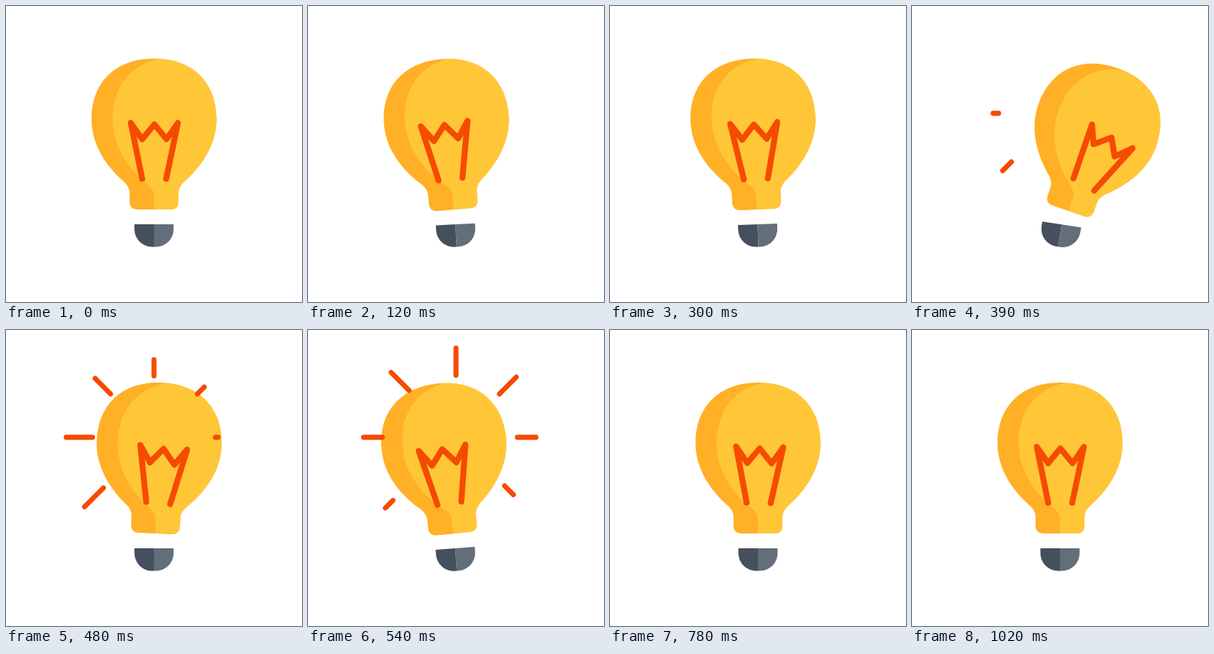
An HTML page that plays this animation: 400 by 400 pixels, repeating every 2.05 s.

```html
<!DOCTYPE html>
<html lang="en">
<head>
<meta charset="utf-8">
<title>Light bulb</title>
<style>
  html, body { margin: 0; width: 100%; height: 100%; overflow: hidden; background: #fff; }
  svg { display: block; width: 100%; height: 100%; }
  .wire { fill: none; stroke: #f54b00; stroke-linecap: round; stroke-linejoin: round; }
</style>
</head>
<body>
<svg viewBox="0 0 400 400">
  <defs>
    <clipPath id="glass">
      <path id="outline" d="M200 71C147 71 115.5 104 115.5 153C115.5 190 139 220 160 238Q167 245 167 253V264Q167 275 178 275H222Q233 275 233 264V253Q233 245 240 238C261 220 284.5 190 284.5 153C284.5 104 253 71 200 71Z"/>
    </clipPath>
  </defs>
  <g id="base">
    <path fill="#464f5d" d="M173.500 295H200V325.500H197.500A24 24 0 0 1 173.500 301.500Z"/>
    <path fill="#636e7b" d="M200 295H226.500V301.500A24 24 0 0 1 202.500 325.500H200Z"/>
    <g id="bulb">
      <use href="#outline" fill="#ffb026"/>
      <path clip-path="url(#glass)" fill="#ffc738" d="M213 71C170 76 144 108 144 153C144 190 167 222 190 240Q200 247 200 256V280H300V60H213Z"/>
      <path id="filament" class="wire" stroke-width="8" d="M184 233.500L168.700 158L184 180L200.500 160L217 180L232.300 158L216.500 233.500"/>
    </g>
  </g>
  <g id="rays" class="wire" stroke-width="6.8"></g>
</svg>
<script>
const LOOP = 2050, STEP = 30, END = 1020;
const RAYS = 7, RAY_START = 340, RAY_DELAY = 25, RAY_LENGTH = 42;
const $ = id => document.getElementById(id);
const ramp = (t, from, to) => Math.min(1, Math.max(0, (t - from) / (to - from)));
const easeOut = x => Math.sin(Math.PI / 2 * x);
const easeInOut = x => (1 - Math.cos(Math.PI * x)) / 2;
const ease = (t, from, to) => easeInOut(ramp(t, from, to));

// Wind up to the left, swing right, swing back, settle upright
function swing(t, windUp, peak, back) {
  return windUp * ease(t, 0, 252)
    + (peak - windUp) * ease(t, 252, 390)
    + (back - peak) * ease(t, 390, 540)
    - back * ease(t, 540, 780);
}

function rotate(id, angle, pivotY) {
  $(id).setAttribute('transform', `rotate(${angle} 200 ${pivotY})`);
}

const rays = Array.from({ length: RAYS }, () =>
  $('rays').appendChild(document.createElementNS('http://www.w3.org/2000/svg', 'line')));

// Rays appear clockwise from the lower left; each grows outward, then its tail follows
function drawRay(line, i, t) {
  const angle = Math.PI * (3 + i) / 4;
  const dx = Math.cos(angle), dy = Math.sin(angle);
  const inner = 83 + 14 * Math.max(0, dy);
  const age = t - RAY_START - i * RAY_DELAY;
  const head = easeOut(ramp(age, 6, 175));
  const tail = ease(age, 112, 258);
  [tail, head].forEach((k, n) => {
    const r = inner + RAY_LENGTH * k;
    line.setAttribute('x' + (n + 1), 200 + dx * r);
    line.setAttribute('y' + (n + 1), 145 + dy * r);
  });
  line.setAttribute('visibility', head > tail ? 'visible' : 'hidden');
}

function draw(t) {
  const lag = 0.9 * Math.sin(Math.PI * ramp(t, 540, END));
  rotate('base', swing(t, -6.4, 8.7, -4.3), 310);
  rotate('bulb', swing(t, -3.9, 10, -1.7), 310);
  rotate('filament', swing(t, -4.1, 11.7, -1.7) + lag, 274);
  rays.forEach((line, i) => drawRay(line, i, t));
}

const start = performance.now();
function tick() {
  const t = (performance.now() - start) % LOOP;
  draw(Math.min(END, Math.floor(t / STEP) * STEP));
  requestAnimationFrame(tick);
}
draw(0);
requestAnimationFrame(tick);
</script>
</body>
</html>
```
